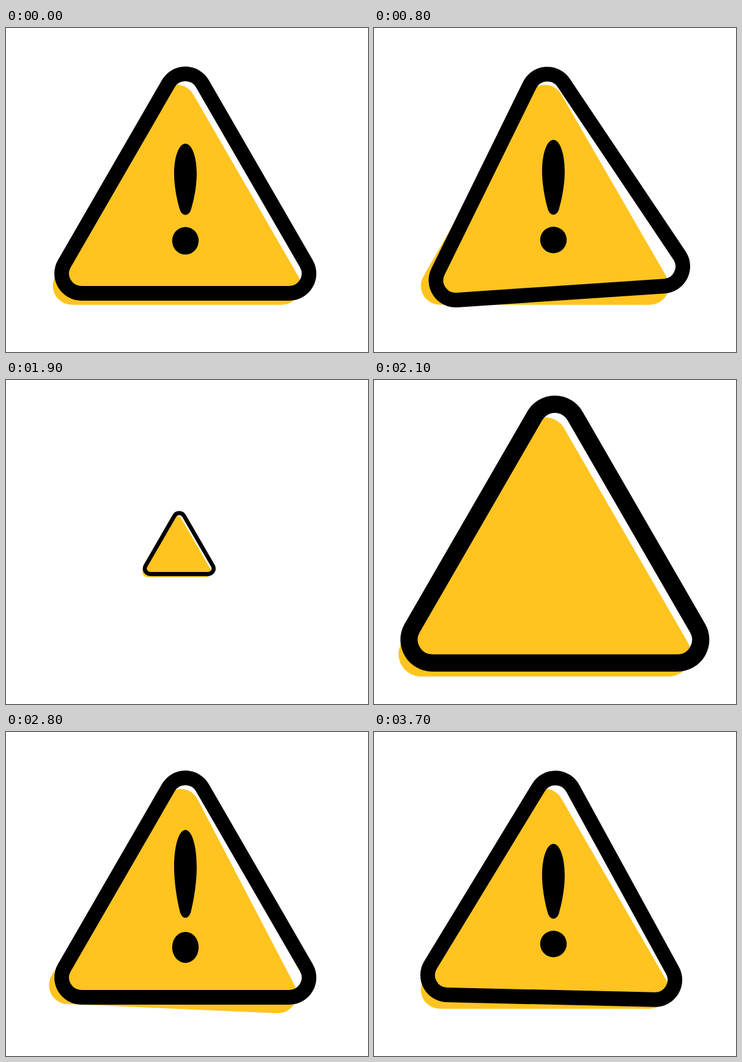
Write an HTML page that moves like this. It is 592 by 530 pixels and loops after 3800 ms.

```html
<!DOCTYPE html>
<html lang="en">
<head>
<meta charset="utf-8">
<title>Warning sign</title>
<style>
  html, body { margin: 0; width: 100%; height: 100%; overflow: hidden; background: #fff; }
  svg { display: block; width: 100%; height: 100%; }
</style>
</head>
<body>
<svg viewBox="0 0 592 530">
  <g id="sign">
    <path id="plate" fill="#ffc41f"/>
    <path id="rim" fill="none" stroke="#000" stroke-width="24"/>
    <path id="bar" d="M293.4 183C304.4 183 311.9 206 311.9 235C311.9 256 307 281 302.6 296C301 301.7 297.5 305.3 293.4 305.3C289.3 305.3 285.8 301.7 284.2 296C279.8 281 274.9 256 274.9 235C274.9 206 282.4 183 293.4 183Z"/>
    <circle id="dot" cx="293.4" cy="346.7" r="21.7"/>
  </g>
</svg>
<script>
const LOOP = 3800, STEP = 100;
const RESTART = 1800;   // the sign vanishes and pops in again after this
const LEAD = 2600;      // the loop opens this far into the sequence

// [time, value] keys, eased in and out between neighbours
const POP = [[1806, 0], [2104, 1.18], [2175, 1.18], [2600, 1]];
const PLATE_TURN = [[2690, 0], [2890, 4.3], [3075, -5.5], [3270, 0]];
const RIM_TURN = [[3225, 0], [3400, -3.85], [3580, 3.05], [3800, 0]];
const DOT_DELAY = 560, BAR_DELAY = 580;

const el = id => document.getElementById(id);
const [sign, plate, rim, bar, dot] = ['sign', 'plate', 'rim', 'bar', 'dot'].map(el);

// Rounded equilateral triangle from its corner centres
function triangle(cx, top, half, r) {
  const base = top + half * Math.sqrt(3);
  const dx = r * Math.sqrt(3) / 2, dy = r / 2;
  const arc = (x, y) => `A${r} ${r} 0 0 1 ${x} ${y}`;
  return `M${cx - dx} ${top - dy}` + arc(cx + dx, top - dy) +
    `L${cx + half + dx} ${base - dy}` + arc(cx + half, base + r) +
    `L${cx - half} ${base + r}` + arc(cx - half - dx, base - dy) + 'Z';
}

function at(keys, t) {
  if (t <= keys[0][0]) return keys[0][1];
  for (let i = 1; i < keys.length; i++) {
    const [t0, a] = keys[i - 1], [t1, b] = keys[i];
    if (t < t1) {
      const p = (t - t0) / (t1 - t0);
      return a + (b - a) * p * p * (3 - 2 * p);
    }
  }
  return keys[keys.length - 1][1];
}

const put = (node, value) => node.setAttribute('transform', value);
const scale = (x, y, sx, sy) =>
  `translate(${x} ${y}) scale(${sx} ${sy}) translate(${-x} ${-y})`;

function draw(ms) {
  const t = ms <= RESTART ? ms + LEAD : ms;
  const size = at(POP, t);
  put(sign, scale(279.4, 272.5, size, size));
  put(plate, `rotate(${at(PLATE_TURN, t)} 279.4 272.5)`);
  put(rim, `rotate(${at(RIM_TURN, t)} 293.3 254.5)`);
  put(bar, scale(293.4, 313.5, 1, at(POP, t - BAR_DELAY)));
  put(dot, scale(293.4, 313.5, 1, at(POP, t - DOT_DELAY)));
}

plate.setAttribute('d', triangle(279.4, 124.1, 171.8, 31));
rim.setAttribute('d', triangle(293.3, 107.4, 169.9, 32.3));

const start = performance.now();
function tick() {
  const ms = (performance.now() - start) % LOOP;
  draw(Math.floor(ms / STEP) * STEP);
  requestAnimationFrame(tick);
}
tick();
</script>
</body>
</html>
```
